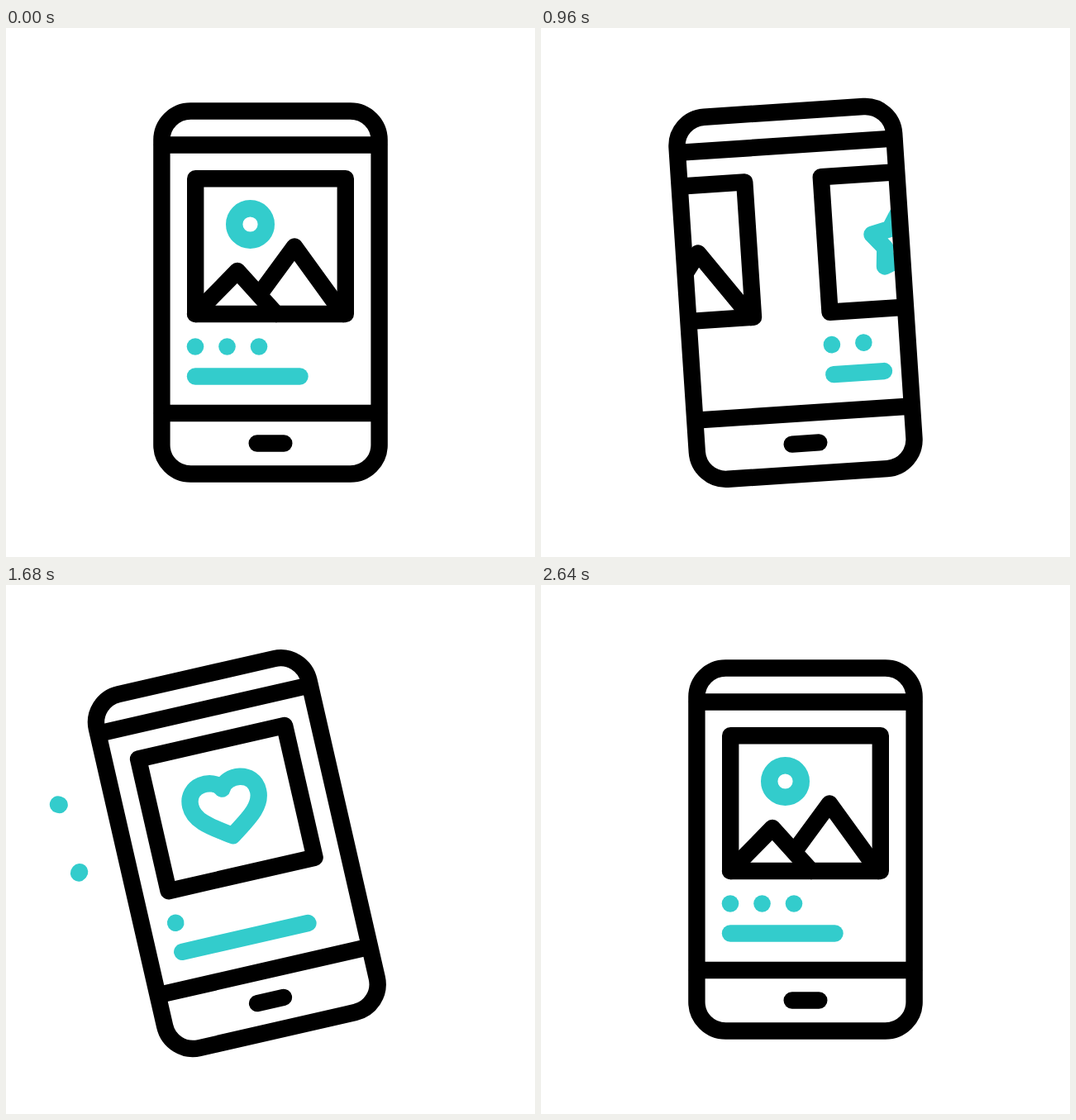
An HTML page for the animation above (3 s loop, 640 px wide and 640 px high).

```html
<!DOCTYPE html>
<html lang="en">
<head>
<meta charset="utf-8">
<title>Phone swipe</title>
<style>
  html, body { margin: 0; width: 100%; height: 100%; overflow: hidden; background: #fff; }
  svg { display: block; width: 100vw; height: 100vh; }
  .ink, .teal { fill: none; stroke: #000; stroke-width: 20.4; stroke-linecap: round; stroke-linejoin: round; }
  .teal { stroke: #33cccc; }
  .dot { fill: #33cccc; }
</style>
</head>
<body>
<svg viewBox="0 0 640 640">
  <defs>
    <clipPath id="screen"><rect x="190" y="142" width="260" height="324"/></clipPath>
  </defs>
  <g id="phone">
    <g clip-path="url(#screen)"><g id="strip"></g></g>
    <g class="ink">
      <rect x="188.4" y="100.5" width="263.2" height="439" rx="35"/>
      <path d="M189 141.5H451M189 466H451M303.7 502.5H336.3"/>
    </g>
  </g>
  <g id="sparks"></g>
</svg>
<script>
const LOOP = 3000, STEP = 40, PITCH = 274.3;
const $ = id => document.getElementById(id);

function add(parent, tag, attrs) {
  const el = document.createElementNS("http://www.w3.org/2000/svg", tag);
  for (const k in attrs) el.setAttribute(k, attrs[k]);
  return parent.appendChild(el);
}

// quick start, long soft landing: cubic-bezier(.54, 0, .22, 1)
function ease(u) {
  if (u <= 0) return 0;
  if (u >= 1) return 1;
  let lo = 0, hi = 1, s = 0.5;
  for (let i = 0; i < 24; i++) {
    s = (lo + hi) / 2;
    const q = 1 - s;
    const x = 3 * q * q * s * 0.54 + 3 * q * s * s * 0.22 + s * s * s;
    if (x < u) lo = s; else hi = s;
  }
  return s * s * (3 - 2 * s);
}

function smooth(u) {
  u = Math.min(1, Math.max(0, u));
  return u * u * (3 - 2 * u);
}

// keys: [time, value] pairs
function track(keys, t) {
  if (t <= keys[0][0]) return keys[0][1];
  for (let i = 1; i < keys.length; i++) {
    const [t0, a] = keys[i - 1], [t1, b] = keys[i];
    if (t < t1) return a + (b - a) * ease((t - t0) / (t1 - t0));
  }
  return keys[keys.length - 1][1];
}

const tilt = [[240, 0], [580, 4.85], [1520, -13], [1600, -13], [2570, 0]];
const scroll = [[280, 0], [640, -12], [1600, 2 * PITCH], [1680, 2 * PITCH], [2640, 0]];
const barLength = [[240, 126.5], [840, 55], [1480, 156], [1640, 156], [2040, 166], [2640, 126.5]];

function starPath(cx, cy, outer, inner) {
  let d = "";
  for (let i = 0; i < 10; i++) {
    const r = i % 2 ? inner : outer, a = i * Math.PI / 5;
    d += (i ? "L" : "M") + (cx + r * Math.sin(a)).toFixed(2) + " " + (cy - r * Math.cos(a)).toFixed(2);
  }
  return d + "Z";
}

const art = [
  g => {
    add(g, "circle", { class: "teal", cx: 295.5, cy: 237.5, r: 19.3 });
    add(g, "path", { class: "ink", d: "M229 346L280 294L327 346M309 319L349 264.5L408 346" });
  },
  g => add(g, "path", { class: "teal", d: starPath(320, 266.5, 35.5, 20) }),
  g => add(g, "path", {
    class: "teal",
    d: "M320 240C312 224 278 226 278 252C278 272 300 284 320 298C340 284 362 272 362 252C362 226 328 224 320 240Z"
  })
];

const bars = art.map((draw, i) => {
  const g = add($("strip"), "g", { transform: `translate(${i * PITCH} 0)` });
  draw(g);
  add(g, "rect", { class: "ink", x: 229.2, y: 182.2, width: 181.6, height: 163.8 });
  for (let k = 0; k < 3 - i; k++)
    add(g, "circle", { class: "dot", cx: 229 + 38.5 * k, cy: 385.5, r: 10.3 });
  return add(g, "path", { class: "teal" });
});

// inner point, outer point, start time
const sparks = [
  [503, 250, 539.5, 226.5, 400],
  [502.5, 290, 539.5, 314.5, 400],
  [101, 276.5, 63, 265.5, 1380],
  [114, 317.5, 88, 348.5, 1380]
].map(spec => ({ spec, el: add($("sparks"), "path", { class: "teal" }) }));

function drawSpark({ spec: [x0, y0, x1, y1, start], el }, t) {
  const head = smooth((t - start) / 160), tail = smooth((t - start - 160) / 160);
  const at = u => (x0 + (x1 - x0) * u) + " " + (y0 + (y1 - y0) * u);
  el.setAttribute("d", head > tail ? `M${at(tail)}L${at(head)}` : "");
}

function render(now) {
  const t = Math.floor(now % LOOP / STEP) * STEP;
  $("phone").setAttribute("transform", `rotate(${track(tilt, t)} 320 502.5)`);
  $("strip").setAttribute("transform", `translate(${-track(scroll, t)} 0)`);
  const len = track(barLength, t);
  for (const bar of bars) bar.setAttribute("d", `M229 421.5h${len}`);
  for (const s of sparks) drawSpark(s, t);
}

let begin = null;
function tick(now) {
  if (begin === null) begin = now;
  render(now - begin);
  requestAnimationFrame(tick);
}
render(0);
requestAnimationFrame(tick);
</script>
</body>
</html>
```
